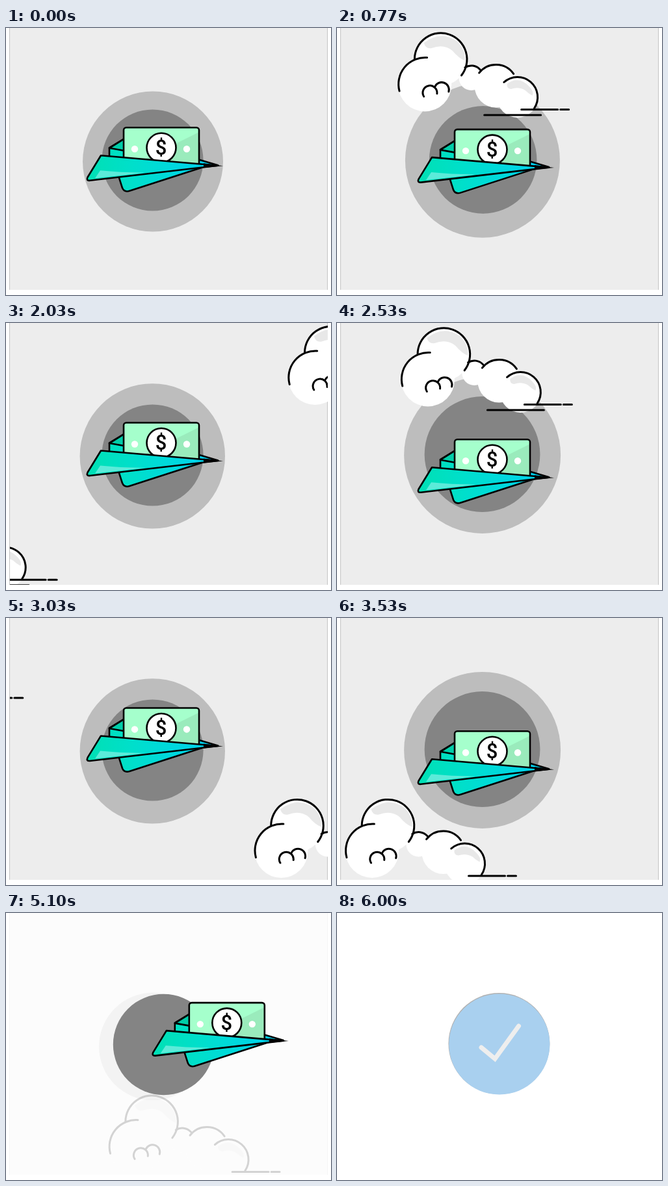
Write an HTML page that moves like this. It is 500 by 411 pixels and loops after 7030 ms.

```html
<!DOCTYPE html>
<html lang="en">
<head>
<meta charset="utf-8">
<title>Money transfer</title>
<style>
html, body { margin: 0; width: 100%; height: 100%; overflow: hidden; background: #fff; }
svg { display: block; width: 500px; height: 411px; }
.ink { stroke: #000; stroke-width: 2.6; stroke-linejoin: round; }
.line { fill: none; stroke: #000; stroke-width: 3; stroke-linecap: round; }
</style>
</head>
<body>
<svg viewBox="0 0 500 411">
  <defs>
    <clipPath id="stage"><rect x="6" y="0" width="489" height="403"/></clipPath>
    <linearGradient id="teal" gradientUnits="userSpaceOnUse" x1="125" y1="0" x2="325" y2="0">
      <stop offset="0" stop-color="#00e0b4"/>
      <stop offset=".35" stop-color="#00dfcb"/>
      <stop offset="1" stop-color="#00d0f2"/>
    </linearGradient>
    <g id="cloud">
      <g fill="#fff">
        <circle cx="207" cy="77" r="19"/>
        <circle cx="245" cy="89.500" r="33"/>
        <circle cx="278" cy="106.500" r="31.500"/>
        <circle cx="160" cy="48.200" r="40.300"/>
        <circle cx="135.500" cy="87.500" r="41"/>
      </g>
      <g fill="#e8e8e8">
        <path d="M134 23Q160 3 184 20Q199 33 197 50Q188 47 178 35Q165 24 146 31Q137 33 134 23Z"/>
        <path d="M262 86Q280 73 296 90Q304 98 301 104Q295 101 290 96Q280 90 268 94Q261 93 262 86Z"/>
      </g>
      <path id="outline" class="line"/>
      <path class="line" stroke-linecap="butt" d="M284 125.500H340M344 125.500H357M227 134H314"/>
    </g>
  </defs>

  <g id="panel">
    <rect x="5" y="0" width="490" height="403" fill="#ededed"/>
    <path d="M5.500 0V403M494.500 0V403" stroke="#c4c4c4"/>
  </g>
  <circle id="ring" fill="#bdbdbd"/>
  <circle id="rim" fill="#b2b2b2"/>
  <circle id="core"/>
  <g id="clouds" clip-path="url(#stage)">
    <use id="high" href="#cloud"/>
    <use id="low" href="#cloud"/>
  </g>
  <g clip-path="url(#stage)">
    <g id="plane">
      <path class="ink" fill="url(#teal)" d="M159 184L187 167V200H159Z"/>
      <path class="ink" fill="#00cda8" d="M159 184.500L187 167V189.500Z"/>
      <path class="ink" fill="url(#teal)" d="M172 224L179 246Q182 253 190 250.500L303 214Z"/>
      <path class="ink" fill="#00d0ee" d="M292 201L326 211L292 212Z"/>
      <rect x="181" y="153" width="116" height="62" rx="4" fill="#a5ffcc"/>
      <path fill="#9aebbc" d="M297 160V214H188Z"/>
      <rect class="ink" x="181" y="153" width="116" height="62" rx="4" fill="none"/>
      <circle class="ink" cx="239" cy="184" r="22.500" fill="#fff"/>
      <text x="238.500" y="194.800" text-anchor="middle" font-family="Roboto, 'Liberation Sans', sans-serif" font-size="31" font-weight="500">$</text>
      <circle cx="198" cy="186" r="5.200" fill="#fff"/>
      <circle cx="278" cy="186" r="5.200" fill="#fff"/>
      <path class="ink" fill="url(#teal)" d="M146 196L326 211.500L129 234.500Q123 235 125.500 229.500Z"/>
      <path fill="#5cebd9" d="M137 231L145 219Q174 222 213 222.500Z"/>
      <path d="M304 208L334 212L304 215Z"/>
    </g>
  </g>
  <path id="tick" fill="none" stroke="#eee" stroke-width="7" stroke-linecap="round" pathLength="100" d="M222 207L243 224.500L279.500 174"/>
</svg>
<script>
const LOOP = 7030, DRIFT = 1767, EXIT = 5000;
const $ = id => document.getElementById(id);
const clamp = v => Math.max(0, Math.min(1, v));
const span = (t, a, b) => clamp((t - a) / (b - a));
const mix = (a, b, k) => a + (b - a) * k;
const smooth = k => (1 - Math.cos(Math.PI * k)) / 2;
const wave = (t, peak, period) => Math.cos(2 * Math.PI * (t - peak) / period);

function set(id, attrs) {
  for (const name in attrs) $(id).setAttribute(name, attrs[name]);
}

// Clockwise arc between two angles in degrees
function arc([cx, cy, r, from, to]) {
  const at = deg => {
    const a = deg * Math.PI / 180;
    return `${cx + r * Math.cos(a)} ${cy + r * Math.sin(a)}`;
  };
  return `M${at(from)}A${r} ${r} 0 ${to - from > 180 ? 1 : 0} 1 ${at(to)}`;
}

const outline = [
  [160, 48.2, 40.3, 181, 398],
  [136, 86.5, 41, 165, 274],
  [143.3, 99.7, 11, 148, 367],
  [161.3, 95, 11.3, 202, 376],
  [207, 76, 18, 237, 318],
  [245, 89.5, 33, 218, 325],
  [278, 106.5, 31, 228, 394]
];

// Eased value between neighbouring [time, value] keys
function track(keys, t) {
  let i = 1;
  while (i < keys.length - 1 && t > keys[i][0]) i++;
  const [a, from] = keys[i - 1], [b, to] = keys[i];
  return mix(from, to, smooth(span(t, a, b)));
}

const bob = [[0, 0], [500, 26.3], [1000, -15.2], [1500, 21.2], [2000, 0]];
const pulse = [[120, 108], [590, 121], [770, 119], [1030, 111.7], [1120, 108]];

function drawClouds(t) {
  const p = t % DRIFT;
  set('high', { x: 517 - 0.671 * p, y: -1.3 + 1.3 * wave(p, 730, 1000) });
  const first = 900, q = (t - first + DRIFT) % DRIFT;
  set('low', {
    x: 557 - 0.739 * q,
    y: 271.5 + 1.7 * wave(q, 613, 1000),
    visibility: t < first ? 'hidden' : 'inherit'
  });
}

function drawDiscs(t) {
  const r = t < 120 ? 108 : track(pulse, 120 + (t - 120) % 1000);
  const k = (r - 108) / 12;
  set('ring', { cx: 226 - 2.3 * k, cy: 205.5 - 2 * k, r: mix(r, 78, span(t, EXIT, 5120)) });

  const beat = (1 - wave(t, 0, 1000)) / 2;
  const slide = smooth(span(t, EXIT, 5160));
  const pop = 5 * Math.sin(Math.PI * span(t, 5170, 5650));
  const live = t < EXIT ? beat : 0;
  const tint = smooth(span(t, 5170, 6000));
  const color = [169, 208, 239].map(c => Math.round(mix(132, c, tint)));
  set('core', {
    cx: mix(225.5 - 2 * live, 249.8, slide),
    cy: mix(203.5 - 1.5 * live, 202, slide),
    r: 78 + 11 * live + pop - 0.4 * slide,
    fill: `rgb(${color})`
  });
  set('rim', { cx: 249.4, cy: 201, r: 78 + pop, opacity: t > 5170 ? 1 : 0 });
}

function draw(t) {
  const fade = 1 - span(t, EXIT, 5120);
  for (const id of ['panel', 'ring', 'clouds']) set(id, { opacity: fade });
  drawClouds(t);
  drawDiscs(t);

  const dx = 400 * Math.max(0, (t - 4850) / 500) ** 2;
  const dy = t < EXIT ? track(bob, t % 2000) : -15.2;
  set('plane', {
    transform: `translate(${dx} ${dy + 0.3})`,
    visibility: t < 5400 ? 'visible' : 'hidden'
  });

  const drawn = 100 * smooth(span(t, 5450, 5850));
  set('tick', { 'stroke-dasharray': `${drawn} 200`, visibility: drawn > 0 ? 'visible' : 'hidden' });
}

set('outline', { d: outline.map(arc).join('') });
const start = performance.now();
function tick(now) {
  draw(Math.max(0, now - start) % LOOP);
  requestAnimationFrame(tick);
}
draw(0);
requestAnimationFrame(tick);
</script>
</body>
</html>
```
